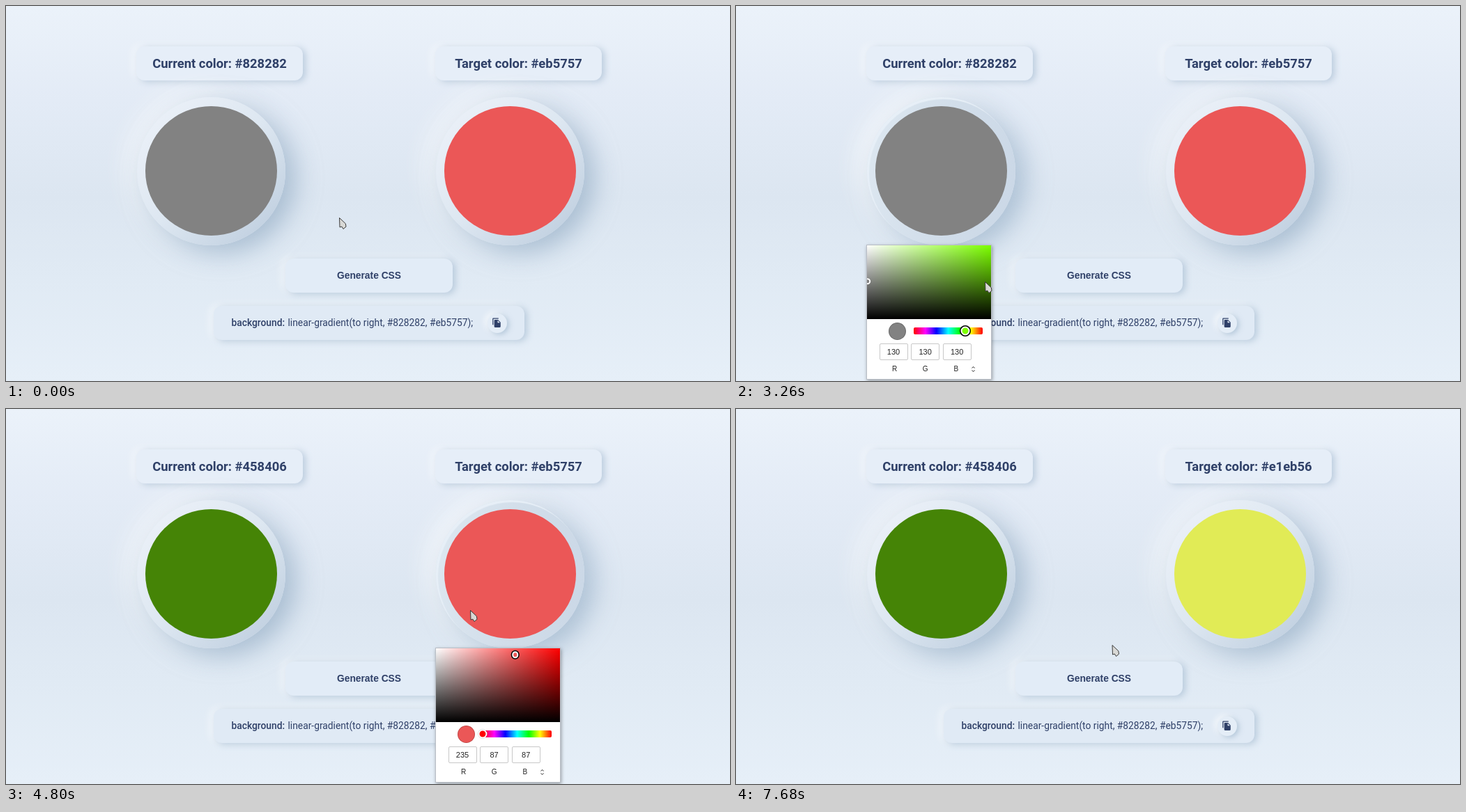
Animation, 1039 px wide and 539 px high, one loop 8000 ms. Source, as an HTML page:

```html
<!DOCTYPE html>
<html lang="en">
<head>
<meta charset="utf-8">
<title>Gradient generator</title>
<style>
  html, body { margin: 0; width: 100%; height: 100%; overflow: hidden; }
  #stage {
    position: absolute; inset: 0; width: 1039px; height: 539px; overflow: hidden;
    color: #2f4068; font-family: Roboto, sans-serif;
    background: linear-gradient(#ebf2fa, #e3ebf6 25%, #dce6f1 51%, #e0eaf4 72%, #e6eff8);
  }
  #stage *, #stage *::before { position: absolute; box-sizing: border-box; }
  .card {
    height: 49px; border-radius: 12px; line-height: 49px; text-align: center; white-space: pre;
    background: #e2ecf7;
    box-shadow: 4px 2px 10px rgba(136,165,191,.45), -6px -2px 12px rgba(255,255,255,.45);
  }
  .label { left: 187px; top: 58px; width: 239px; font-size: 18.4px; font-weight: 700; background: #e6eef8; }
  .generate { left: 401px; top: 362.5px; width: 240px; font: 700 13.8px/49px "Liberation Sans", Arial, sans-serif; }
  .output { left: 298px; top: 431px; width: 446px; font-size: 13.8px; background: #e0eaf5; }
  .output span { top: 0; }
  .copy {
    left: 393px; top: 10.5px; width: 28px; height: 28px; border-radius: 50%; background: #e4edf7;
    box-shadow: 3px 2px 7px rgba(136,165,191,.5), -4px -2px 8px rgba(255,255,255,.7);
  }
  .copy svg { left: 6.4px; top: 6.8px; }
  .side { left: 0; top: 0; }
  .dial {
    left: 187.5px; top: 130.5px; width: 213px; height: 213px; border-radius: 50%;
    background: linear-gradient(135deg, #e9eff7 15%, #dde7f1 50%, #c2d1e1 88%);
    box-shadow: 14px 10px 36px rgba(136,165,191,.65), -14px -8px 36px rgba(255,255,255,.62);
  }
  .dial.active {
    background: linear-gradient(100deg, #dee8f1, #d2deea 50%, #cad7e6);
    box-shadow: inset 3px 3px 1px #e7eff7,
      14px 10px 36px rgba(136,165,191,.6), -14px -8px 34px rgba(255,255,255,.7);
  }
  .disc { left: 199.5px; top: 144px; width: 189px; height: 185.5px; border-radius: 50%; }
  .picker {
    left: 188px; top: 344px; width: 178px; height: 192px; overflow: hidden; background: #fff;
    color: #222; font-family: "Liberation Sans", Arial, sans-serif; text-align: center;
    box-shadow: 0 0 0 1px #b9bec6, 1px 2px 5px 1px rgba(0,0,0,.35);
  }
  .field { left: 0; top: 0; width: 178px; height: 106px; }
  .field::before {
    content: ""; inset: 0;
    background: linear-gradient(transparent, #000), linear-gradient(to right, #fff, transparent);
  }
  .swatch { left: 31px; top: 111px; width: 25px; height: 25px; border-radius: 50%; border: 1px solid rgba(0,0,0,.18); }
  .hue {
    left: 67px; top: 118px; width: 99px; height: 10px; border-radius: 2px;
    background: linear-gradient(to left, #f00, #ff0 17%, #0f0 33%, #0ff 50%, #00f 67%, #f0f 83%, #f00);
  }
  .thumb { border-radius: 50%; transform: translate(-50%, -50%); border: 2px solid #fff; box-shadow: 0 0 1px rgba(0,0,0,.4); }
  .thumb.focus { box-shadow: 0 0 0 1.5px #000; }
  .fieldThumb { width: 9.5px; height: 9.5px; }
  .hueThumb { width: 13px; height: 13px; top: 123px; }
  .value { top: 141px; width: 41px; height: 24px; line-height: 23px; font-size: 11px; border: 1px solid #c8c8c8; border-radius: 2px; }
  .channel { top: 170px; width: 20px; font-size: 10px; line-height: 15px; }
  .arrows { left: 148.5px; top: 172.5px; fill: none; stroke: #222; }
  #ring { width: 18px; height: 18px; margin: -9px; border-radius: 50%; background: rgba(255,255,0,.47); }
  #cursor { left: 0; top: 0; overflow: visible; }
</style>
</head>
<body>
<div id="stage">
  <div class="card generate">Generate CSS</div>
  <div class="card output">
    <span style="left:25.5px;font-weight:500">background:</span>
    <span style="left:106.5px">linear-gradient(to right, #828282, #eb5757);</span>
    <div class="copy">
      <svg width="14.6" height="14.6" viewBox="0 0 24 24" fill="#2f4068">
        <path d="M16 1H4c-1.1 0-2 .9-2 2v14h2V3h12V1zm-1 4l6 6v10c0 1.1-.9 2-2 2H8c-1.1 0-2-.9-2-2V7c0-1.1.9-2 2-2h7zm-1 7h5.5L14 6.5V12z"/>
      </svg>
    </div>
  </div>
  <div id="sides" style="left:0;top:0"></div>
  <div id="ring"></div>
  <svg id="cursor" width="12" height="18">
    <path d="M.5 .5L1 14L3.8 13L6 16.5L10 13.2L9.3 8.8Z" fill="#d9d9d6" stroke="#3a3a3a" stroke-linejoin="round"/>
  </svg>
</div>
<script>
const LOOP = 8000;
const $ = id => document.getElementById(id);

// Pointer moves: start, end, number of steps, destination
const START = [478, 304];
const MOVES = [
  [80, 310, 4, 334, 268],
  [1180, 1180, 1, 334, 282],
  [1255, 1950, 10, 333, 463],
  [2020, 2330, 5, 330, 466],
  [2730, 3260, 8, 357, 396],
  [3800, 4570, 11, 666, 289],
  [5280, 6040, 11, 765, 462],
  [6750, 7360, 9, 539.5, 339],
];
const CLICKS = [[630, 780], [2020, 2500], [3340, 3490], [4570, 4720], [6120, 6270], [7510, 7680]];

const SIDES = [
  {
    title: "Current", offset: 0, opens: 780, active: 630, closes: 4570,
    colors: [[130, 130, 130], [69, 132, 6]], changes: 3340,
    hueAt: t => t < 2020 ? 67 : 144 - 3 * stepped(t, 2020, 2330, 5),
    fieldAt: t => t < 3340 ? [.5, 51.5] : [168, 51.5],
    hueFocus: t => t >= 2020 && t < 3340,
  },
  {
    title: "Target", offset: 429, opens: 4720, active: 4570, closes: 7510,
    colors: [[235, 87, 87], [225, 235, 86]], changes: 6120,
    hueAt: t => t < 6120 ? 67 : 148,
    fieldAt: () => [113.5, 9],
    hueFocus: t => t >= 6120,
  },
];

const between = (t, [from, to]) => t >= from && t < to;
const ease = p => p * p * p * (p * (6 * p - 15) + 10);
const hex = rgb => "#" + rgb.map(v => v.toString(16).padStart(2, "0")).join("");

// Progress in equal held steps; the first step shows at t0, the last at t1
function stepped(t, t0, t1, count) {
  if (t < t0) return 0;
  if (t >= t1) return 1;
  return (Math.floor((t - t0) / (t1 - t0) * (count - 1) + .01) + 1) / count;
}

function pointerAt(t) {
  let [x, y] = START;
  for (const [t0, t1, count, toX, toY] of MOVES) {
    const p = ease(stepped(t, t0, t1, count));
    x += (toX - x) * p;
    y += (toY - y) * p;
  }
  return [x, y];
}

function buildSide(side) {
  const root = document.createElement("div");
  root.className = "side";
  root.style.left = side.offset + "px";
  const channels = [..."RGB"].map((name, i) => `
    <div class="value" style="left:${17.5 + 45.6 * i}px"></div>
    <div class="channel" style="left:${29.5 + 44.2 * i}px">${name}</div>`).join("");
  root.innerHTML = `
    <div class="card label"></div>
    <div class="dial"></div>
    <div class="disc"></div>
    <div class="picker">
      <div class="field"></div>
      <div class="thumb fieldThumb"></div>
      <div class="swatch"></div>
      <div class="hue"></div>
      <div class="thumb hueThumb"></div>
      ${channels}
      <svg class="arrows" width="7" height="10"><path d="M1.5 3.5L3.5 1.5L5.5 3.5M1.5 6.5L3.5 8.5L5.5 6.5"/></svg>
    </div>`;
  $("sides").append(root);
  side.el = {};
  for (const name of ["label", "dial", "disc", "picker", "field", "fieldThumb", "swatch", "hueThumb"])
    side.el[name] = root.querySelector("." + name);
  side.values = root.querySelectorAll(".value");
}

function drawSide(side, t) {
  const { el, colors } = side;
  const rgb = colors[+(t >= side.changes)];
  const color = hex(rgb);
  el.label.textContent = `${side.title} color: ${hex(colors[+(t >= side.closes)])}`;
  el.dial.classList.toggle("active", between(t, [side.active, side.closes]));
  el.disc.style.background = el.swatch.style.background = el.fieldThumb.style.background = color;
  el.picker.style.display = between(t, [side.opens, side.closes]) ? "block" : "none";

  const hueX = side.hueAt(t);
  const pure = `hsl(${(166 - hueX) / 99 * 360} 100% 50%)`;
  el.field.style.background = el.hueThumb.style.background = pure;
  el.hueThumb.style.left = hueX + "px";
  const [x, y] = side.fieldAt(t);
  el.fieldThumb.style.left = x + "px";
  el.fieldThumb.style.top = y + "px";
  el.hueThumb.classList.toggle("focus", side.hueFocus(t));
  el.fieldThumb.classList.toggle("focus", !side.hueFocus(t));
  side.values.forEach((box, i) => box.textContent = rgb[i]);
}

function draw() {
  const t = performance.now() % LOOP;
  SIDES.forEach(side => drawSide(side, t));
  const [x, y] = pointerAt(t);
  $("cursor").style.transform = `translate(${x}px, ${y}px)`;
  $("ring").style.transform = `translate(${x}px, ${y}px)`;
  $("ring").style.display = CLICKS.some(click => between(t, click)) ? "block" : "none";
  requestAnimationFrame(draw);
}

SIDES.forEach(buildSide);
draw();
</script>
</body>
</html>
```
